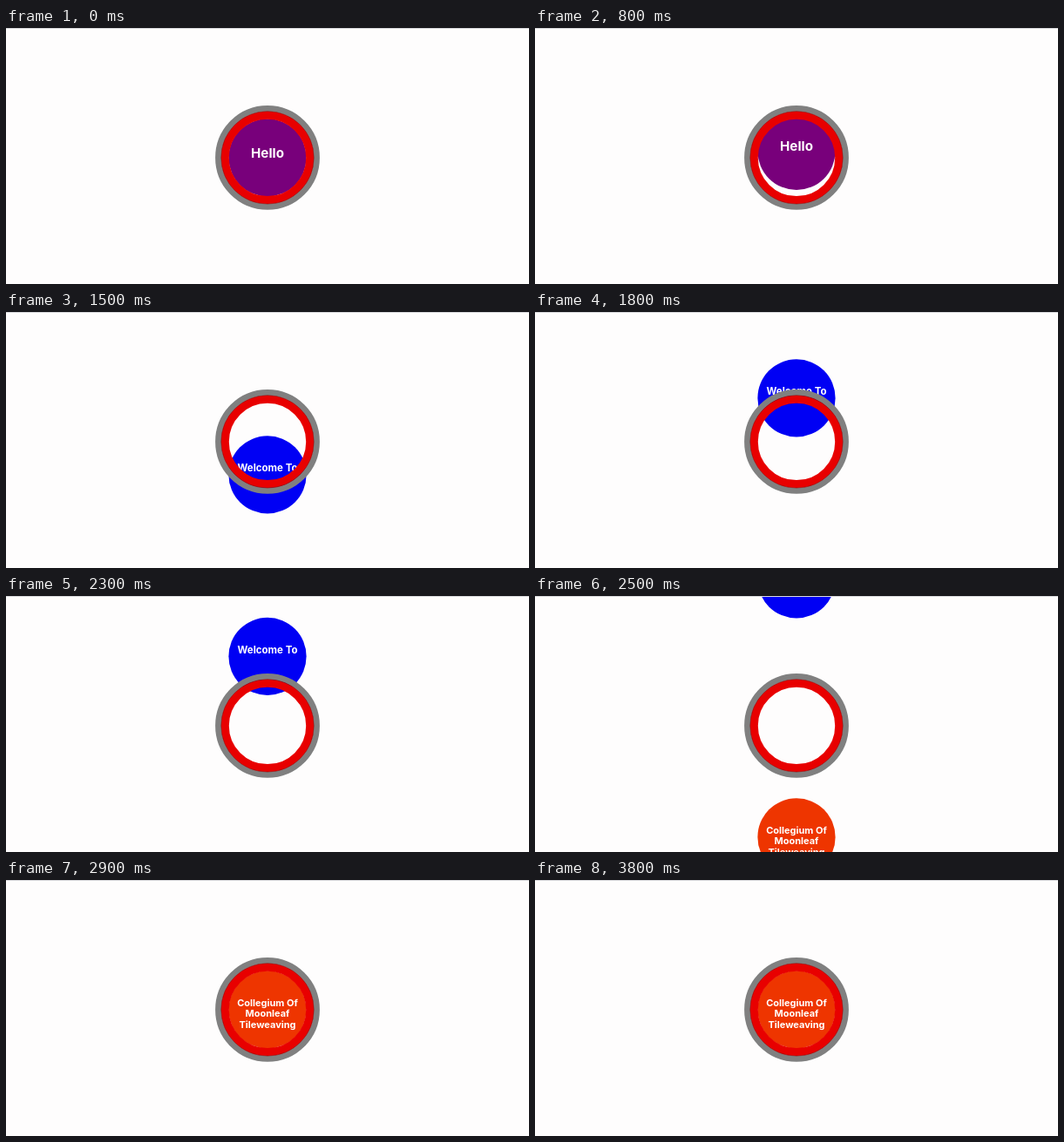
Animation, 600 px wide and 294 px high, one loop 5.9 s. Source, as an HTML page:

```html
<!DOCTYPE html>
<html lang="en">
<head>
<meta charset="utf-8">
<title>Scrolling badges</title>
<style>
  html, body { margin: 0; width: 100%; height: 100%; overflow: hidden; background: #fefdfd; }
  svg { display: block; width: 100%; height: 100%; }
  text { fill: #fff; font-family: Inter, "Open Sans", sans-serif; font-weight: 700; text-anchor: middle; }
</style>
</head>
<body>
<svg viewBox="0 0 600 294">
  <rect width="600" height="294" fill="#fefdfd"/>
  <g id="track"></g>
  <g fill="none">
    <circle cx="300" cy="148.9" r="56.4" stroke="#808080" stroke-width="7"/>
    <circle cx="300" cy="148.9" r="48.7" stroke="#e80000" stroke-width="9"/>
    <circle cx="300" cy="148.9" r="53.2" stroke="#7a1010" stroke-width="0.5"/>
  </g>
  <rect width="600" height="1" fill="#d9d9dc"/>
</svg>
<script>
const LOOP = 5900, STEP = 100, GAP = 296, CENTER = 148.9;

const slides = [
  { color: "#78007b", size: 15.2, top: 0, lines: ["Hello"] },
  { color: "#0000f4", size: 11.5, top: -3.5, lines: ["Welcome To"] },
  { color: "#ee3500", size: 11, top: -4, lines: ["Collegium Of", "Moonleaf", "Tileweaving"] }
];

// Each slide is dragged a little, held, then snaps to the next one
const moves = [
  { at: 700, time: 200, by: 15 },
  { at: 1000, time: 650, by: GAP - 15 },
  { at: 1700, time: 100, by: 50 },
  { at: 2140, time: 740, by: GAP - 50 }
];

const track = document.getElementById("track");

function add(parent, tag, attrs, label = "") {
  const el = document.createElementNS("http://www.w3.org/2000/svg", tag);
  for (const name in attrs) el.setAttribute(name, attrs[name]);
  el.textContent = label;
  return parent.appendChild(el);
}

slides.forEach((slide, i) => {
  const cy = CENTER + i * GAP;
  add(track, "circle", { cx: 300, cy, r: 44.6, fill: slide.color });
  slide.lines.forEach((line, n) =>
    add(track, "text", { x: 300, y: cy + slide.top + n * 12.5, "font-size": slide.size }, line));
});

function ease(u) {
  u = Math.min(1, Math.max(0, u));
  return u * u * (3 - 2 * u);
}

function scrollAt(t) {
  return moves.reduce((y, m) => y + m.by * ease((t - m.at) / m.time), 0);
}

function draw(now) {
  const t = Math.floor(now % LOOP / STEP) * STEP;
  track.setAttribute("transform", `translate(0 ${-scrollAt(t)})`);
}

const start = performance.now();
function tick() {
  draw(performance.now() - start);
  requestAnimationFrame(tick);
}
tick();
</script>
</body>
</html>
```
